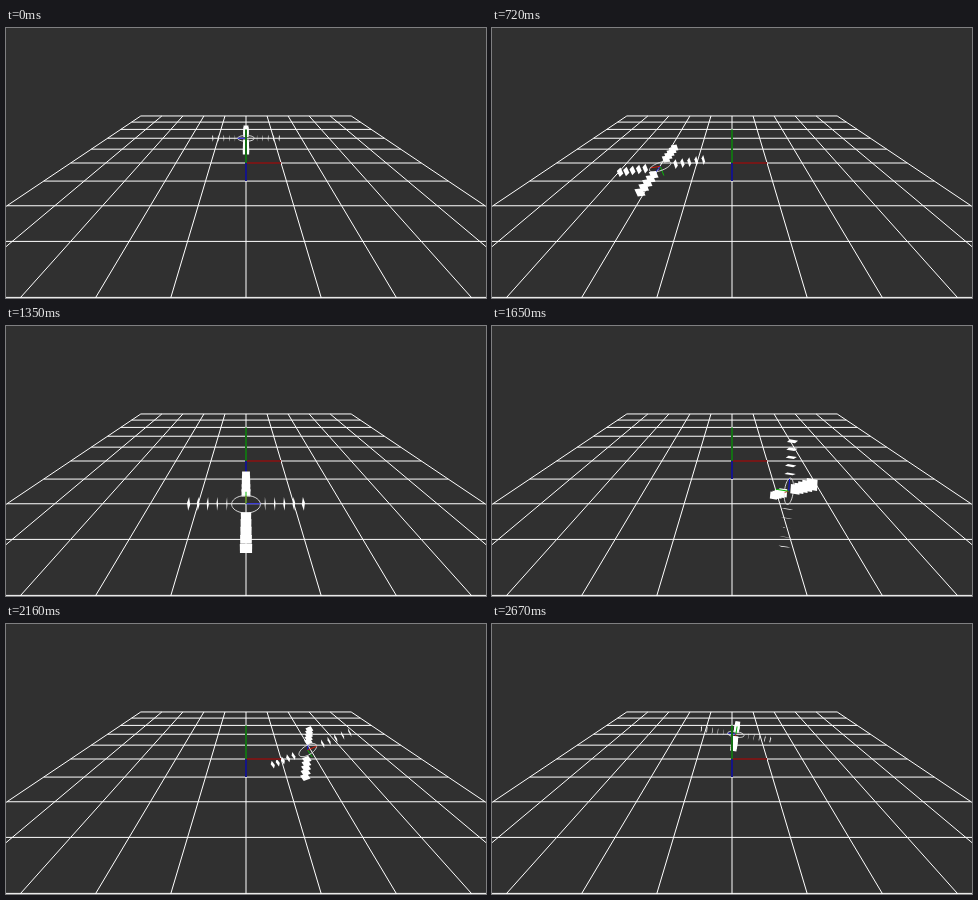
An HTML page with a canvas for the animation above (2.7 s loop, 480 by 270 pixels).

```html
<!DOCTYPE html>
<html lang="en">
<head>
<meta charset="utf-8">
<title>Orbiting cross</title>
<style>
html, body { margin: 0; width: 100%; height: 100%; overflow: hidden; background: #303030; }
canvas { display: block; }
</style>
</head>
<body>
<canvas id="view" width="480" height="270"></canvas>
<script>
const ctx = document.getElementById('view').getContext('2d');
const W = 480, H = 270, STEP = 30, STEPS = 90;

// Camera at (0, 3, 6) looking at the world origin.
const FOCAL = 235.2;
const DIST = Math.hypot(3, 6), SIN = 3 / DIST, COS = 6 / DIST;

const depth = ([, y, z]) => DIST - y * SIN - z * COS;
function project(p) {
  const s = FOCAL / depth(p);
  return [W / 2 + p[0] * s, H / 2 - (p[1] * COS - p[2] * SIN) * s];
}

function trace(points) {
  ctx.beginPath();
  points.forEach(p => ctx.lineTo(...project(p)));
}
function line(points, color, width = 1) {
  trace(points);
  ctx.strokeStyle = color;
  ctx.lineWidth = width;
  ctx.stroke();
}
function polygon(points) {
  trace(points);
  ctx.closePath();
  ctx.fillStyle = '#fff';
  ctx.fill();
}

function drawGrid() {
  for (let i = -5; i <= 5; i++) {
    line([[i, 0, -5], [i, 0, 5]], '#fff');
    line([[-5, 0, i], [5, 0, i]], '#fff');
  }
}
function drawWorldAxes() {
  const o = [0, 0, 0];
  line([o, [1, 0, 0]], '#741818', 2);
  line([o, [0, 1, 0]], '#147014', 2);
  line([o, [0, 0, 1]], '#141488', 2);
}

// Panels stand across each arm, as [u, v] corners.
const CORNERS = [[-0.1, -0.1], [0.1, -0.1], [0.1, 0.1], [-0.1, 0.1]];
const RADIUS = 0.3;

function drawCross(angle) {
  const center = [-2 * Math.sin(angle), 0, -2 * Math.cos(angle)];
  const cb = Math.cos(angle), sb = Math.sin(angle);
  const cc = Math.cos(2 * angle), sc = Math.sin(2 * angle);
  // Yaw by the orbit angle, then roll by twice as much.
  const place = (x, y, z) => {
    const u = x * cb + z * sb, w = z * cb - x * sb;
    return [center[0] + u * cc - y * sc, center[1] + u * sc + y * cc, center[2] + w];
  };

  const parts = [];
  const add = (at, draw) => parts.push({ far: depth(at), draw });

  // All arms shake in and out together.
  const shake = -0.1 * Math.sin(36 * angle);
  for (const side of [-1, 1]) {
    for (let i = 2; i <= 6; i++) {
      const d = side * (i * 0.2 + shake);
      add(place(d, 0, 0), () => polygon(CORNERS.map(([u, v]) => place(d, u, v))));
      add(place(0, 0, d), () => polygon(CORNERS.map(([u, v]) => place(u, v, d))));
    }
  }

  const ring = Array.from({ length: 41 }, (_, i) => {
    const a = i * Math.PI / 20;
    return place(RADIUS * Math.cos(a), 0, RADIUS * Math.sin(a));
  });
  add(center, () => line(ring, '#e8e8e8', 0.9));

  const axis = (x, y, z, color) => {
    const tip = place(x, y, z);
    const mid = tip.map((v, i) => (v + center[i]) / 2);
    add(mid, () => line([center, tip], color));
  };
  axis(0, 0, RADIUS, '#d01808');
  axis(0, RADIUS, 0, '#08b808');
  axis(-RADIUS, 0, 0, '#1010d8');

  parts.sort((a, b) => b.far - a.far).forEach(p => p.draw());
}

function render(ms) {
  const angle = Math.floor(ms / STEP) % STEPS / STEPS * 2 * Math.PI;
  ctx.fillStyle = '#303030';
  ctx.fillRect(0, 0, W, H);
  drawGrid();
  const behind = Math.cos(angle) > 0;
  if (behind) drawCross(angle);
  drawWorldAxes();
  if (!behind) drawCross(angle);
}

const start = performance.now();
function tick() {
  render(performance.now() - start);
  requestAnimationFrame(tick);
}
tick();
</script>
</body>
</html>
```
